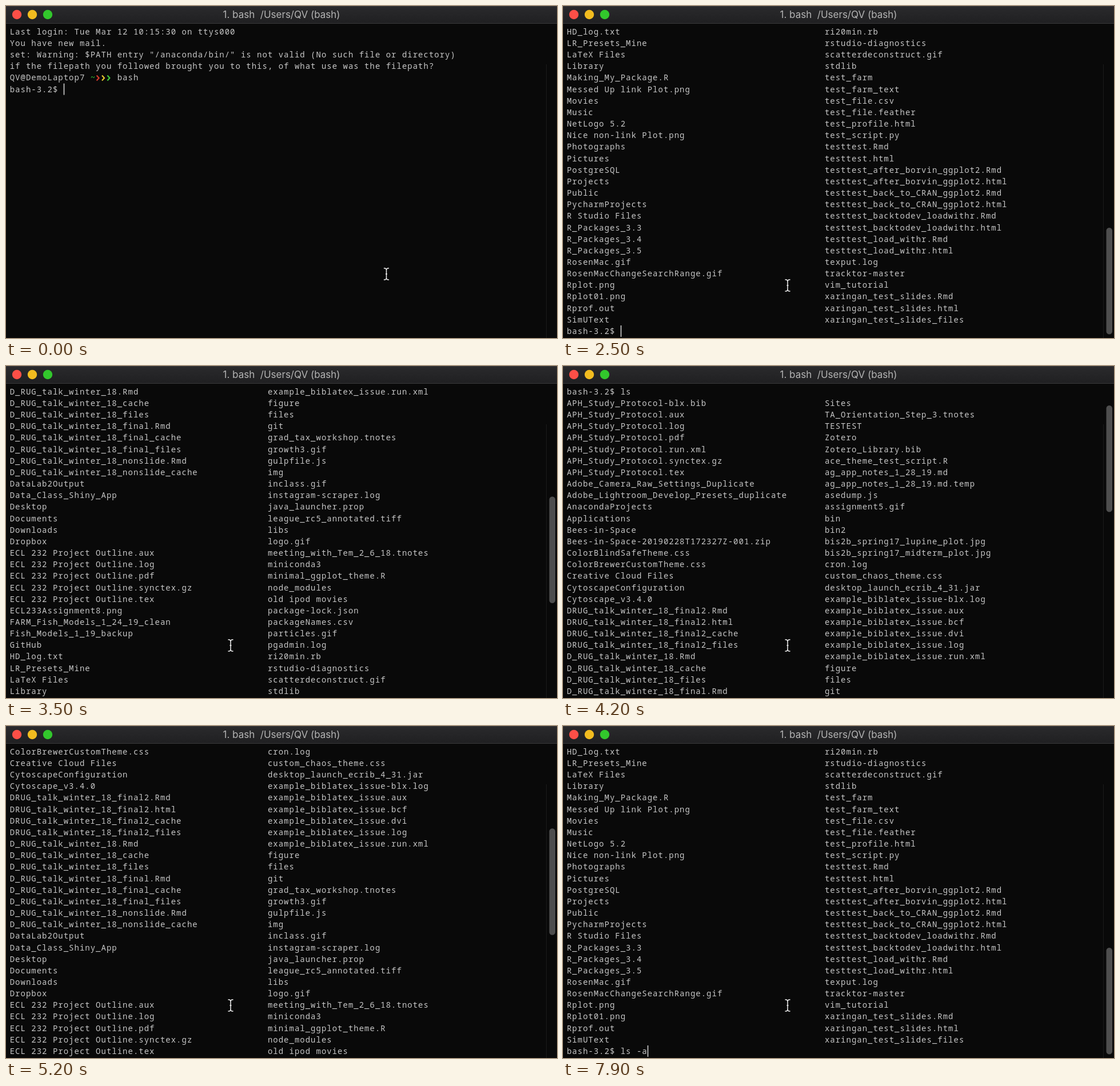
Write an HTML page with a canvas that moves like this. It is 964 px wide and 581 px high and loops after 8000 ms.

```html
<!DOCTYPE html>
<html lang="en">
<head>
<meta charset="utf-8">
<title>Terminal</title>
<style>
  html, body { margin: 0; width: 100%; height: 100%; overflow: hidden; background: #090909; }
  canvas { display: block; }
</style>
</head>
<body>
<canvas id="stage" width="964" height="581"></canvas>
<script>
const ctx = document.getElementById('stage').getContext('2d');
const LOOP = 8000, STEP = 100;
const LEFT = 6.7, TOP = 34.2, CHAR = 9.4, ROW = 20.16, ROWS = 27, TAB = 48;
const MONO = '14px "Noto Sans Mono", monospace';
const PROMPT = 'bash-3.2$ ';

const intro = [
  'Last login: Tue Mar 12 10:15:30 on ttys000',
  'You have new mail.',
  'set: Warning: $PATH entry "/anaconda/bin/" is not valid (No such file or directory)',
  'if the filepath you followed brought you to this, of what use was the filepath?',
  'QV@DemoLaptop7      bash',
];

const listing = `APH_Study_Protocol-blx.bib|Sites
APH_Study_Protocol.aux|TA_Orientation_Step_3.tnotes
APH_Study_Protocol.log|TESTEST
APH_Study_Protocol.pdf|Zotero
APH_Study_Protocol.run.xml|Zotero_Library.bib
APH_Study_Protocol.synctex.gz|ace_theme_test_script.R
APH_Study_Protocol.tex|ag_app_notes_1_28_19.md
Adobe_Camera_Raw_Settings_Duplicate|ag_app_notes_1_28_19.md.temp
Adobe_Lightroom_Develop_Presets_duplicate|asedump.js
AnacondaProjects|assignment5.gif
Applications|bin
Bees-in-Space|bin2
Bees-in-Space-20190228T172327Z-001.zip|bis2b_spring17_lupine_plot.jpg
ColorBlindSafeTheme.css|bis2b_spring17_midterm_plot.jpg
ColorBrewerCustomTheme.css|cron.log
Creative Cloud Files|custom_chaos_theme.css
CytoscapeConfiguration|desktop_launch_ecrib_4_31.jar
Cytoscape_v3.4.0|example_biblatex_issue-blx.log
DRUG_talk_winter_18_final2.Rmd|example_biblatex_issue.aux
DRUG_talk_winter_18_final2.html|example_biblatex_issue.bcf
DRUG_talk_winter_18_final2_cache|example_biblatex_issue.dvi
DRUG_talk_winter_18_final2_files|example_biblatex_issue.log
D_RUG_talk_winter_18.Rmd|example_biblatex_issue.run.xml
D_RUG_talk_winter_18_cache|figure
D_RUG_talk_winter_18_files|files
D_RUG_talk_winter_18_final.Rmd|git
D_RUG_talk_winter_18_final_cache|grad_tax_workshop.tnotes
D_RUG_talk_winter_18_final_files|growth3.gif
D_RUG_talk_winter_18_nonslide.Rmd|gulpfile.js
D_RUG_talk_winter_18_nonslide_cache|img
DataLab2Output|inclass.gif
Data_Class_Shiny_App|instagram-scraper.log
Desktop|java_launcher.prop
Documents|league_rc5_annotated.tiff
Downloads|libs
Dropbox|logo.gif
ECL 232 Project Outline.aux|meeting_with_Tem_2_6_18.tnotes
ECL 232 Project Outline.log|miniconda3
ECL 232 Project Outline.pdf|minimal_ggplot_theme.R
ECL 232 Project Outline.synctex.gz|node_modules
ECL 232 Project Outline.tex|old ipod movies
ECL233Assignment8.png|package-lock.json
FARM_Fish_Models_1_24_19_clean|packageNames.csv
Fish_Models_1_19_backup|particles.gif
GitHub|pgadmin.log
HD_log.txt|ri20min.rb
LR_Presets_Mine|rstudio-diagnostics
LaTeX Files|scatterdeconstruct.gif
Library|stdlib
Making_My_Package.R|test_farm
Messed Up link Plot.png|test_farm_text
Movies|test_file.csv
Music|test_file.feather
NetLogo 5.2|test_profile.html
Nice non-link Plot.png|test_script.py
Photographs|testtest.Rmd
Pictures|testtest.html
PostgreSQL|testtest_after_borvin_ggplot2.Rmd
Projects|testtest_after_borvin_ggplot2.html
Public|testtest_back_to_CRAN_ggplot2.Rmd
PycharmProjects|testtest_back_to_CRAN_ggplot2.html
R Studio Files|testtest_backtodev_loadwithr.Rmd
R_Packages_3.3|testtest_backtodev_loadwithr.html
R_Packages_3.4|testtest_load_withr.Rmd
R_Packages_3.5|testtest_load_withr.html
RosenMac.gif|texput.log
RosenMacChangeSearchRange.gif|tracktor-master
Rplot.png|vim_tutorial
Rplot01.png|xaringan_test_slides.Rmd
Rprof.out|xaringan_test_slides.html
SimUText|xaringan_test_slides_files`.split('\n');

// Time of each key press, and of the return key after the first command
const firstKeys = [1700, 1800], secondKeys = [6500, 6700, 6900, 7300, 7600];
const RETURN = 2000;

// [time, value] points, joined by straight lines
const scrollPath = [[2700, 51], [3500, 28], [4200, 5], [4700, 5], [5200, 20.9], [5600, 51]];
const pointerPath = [[1900, 0], [2400, 1]];
const caretPath = [[0, 1], [200, 0], [500, 0], [700, 1]];

function follow(path, t) {
  if (t <= path[0][0]) return path[0][1];
  for (let i = 1; i < path.length; i++) {
    const [t0, a] = path[i - 1], [t1, b] = path[i];
    if (t < t1) return a + (b - a) * (t - t0) / (t1 - t0);
  }
  return path[path.length - 1][1];
}

const typed = (text, keys, t) => text.slice(0, keys.filter(k => k <= t).length);

function text(str, col, row) {
  ctx.fillText(str, LEFT + col * CHAR, TOP + row * ROW + 15.6);
}

function polyline(points, color, width) {
  ctx.beginPath();
  points.forEach(([x, y]) => ctx.lineTo(x, y));
  ctx.strokeStyle = color;
  ctx.lineWidth = width;
  ctx.stroke();
}

function drawTitleBar() {
  const shade = ctx.createLinearGradient(0, 0, 0, 30);
  shade.addColorStop(0, '#2a2a2c');
  shade.addColorStop(1, '#202022');
  ctx.fillStyle = shade;
  ctx.fillRect(0, 0, 964, 30);
  ctx.fillStyle = '#3a3a3b';
  ctx.fillRect(0, 0, 964, 1);
  ctx.fillRect(0, 30, 964, 1);
  ['#fc4f47', '#f2bc1f', '#32c72c'].forEach((color, i) => {
    ctx.fillStyle = color;
    ctx.beginPath();
    ctx.arc(19 + 27 * i, 15, 8.2, 0, 7);
    ctx.fill();
  });
  ctx.fillStyle = '#b4b4b4';
  ctx.font = '17px Inter, sans-serif';
  ctx.letterSpacing = '0px';
  ctx.textAlign = 'center';
  ctx.fillText('1. bash\u00a0 /Users/QV (bash)', 482, 21.3);
  ctx.textAlign = 'left';
}

function drawShellPrompt(row) {
  ctx.fillStyle = '#35c435';
  text('~', 15, row);
  const y = TOP + row * ROW + 11.2;
  ['#d23a2c', '#e3c52f', '#3fc93a'].forEach((color, i) => {
    const x = 158.6 + i * CHAR;
    polyline([[x, y - 4.5], [x + 4, y], [x, y + 4.5]], color, 2.2);
  });
}

function drawScrollBar(first, visible) {
  ctx.fillStyle = '#1a1a1a';
  ctx.fillRect(945, 102, 1, 479);
  if (!visible) return;
  ctx.fillStyle = '#4e4e4e';
  ctx.beginPath();
  ctx.roundRect(950.5, 34.4 + first * 6.935, 10.5, 186.5, 5.2);
  ctx.fill();
}

function drawPointer(x, y) {
  const color = '#f0f0f0', width = 1.5;
  polyline([[x, y - 8], [x, y + 8]], color, width);
  polyline([[x - 1.5, y], [x + 1.5, y]], color, width);
  for (const s of [-1, 1])
    polyline([[x - 4.5, y + s * 10.3], [x - 1.5, y + s * 9.8], [x, y + s * 8],
              [x + 1.5, y + s * 9.8], [x + 4.5, y + s * 10.3]], color, width);
}

function draw(t) {
  const listed = t >= RETURN;
  const lines = [...intro, PROMPT + typed('ls', firstKeys, t)];
  if (listed) lines.push(...listing, PROMPT + typed('ls -a', secondKeys, t));
  const scroll = listed ? follow(scrollPath, t) : 0;
  const first = Math.floor(scroll);

  ctx.fillStyle = '#090909';
  ctx.fillRect(0, 0, 964, 581);
  drawTitleBar();

  ctx.font = MONO;
  ctx.letterSpacing = '1px';
  lines.slice(first, first + ROWS).forEach((line, row) => {
    ctx.fillStyle = '#c6c6c6';
    line.split('|').forEach((part, i) => text(part, i * TAB, row));
    if (first + row === intro.length - 1) drawShellPrompt(row);
  });

  const last = lines.length - 1, caretRow = last - first;
  if (caretRow < ROWS) {
    ctx.globalAlpha = follow(caretPath, t);
    ctx.fillStyle = '#d0d0d0';
    ctx.fillRect(LEFT + lines[last].length * CHAR, TOP + caretRow * ROW + 0.6, 1.6, 20);
    ctx.globalAlpha = 1;
  }

  drawScrollBar(scroll, listed);
  const p = follow(pointerPath, t);
  drawPointer(665.5 - 272.5 * p, 469 + 20 * p);
}

function tick(now) {
  draw(Math.floor(now % LOOP / STEP) * STEP);
  requestAnimationFrame(tick);
}
requestAnimationFrame(tick);
</script>
</body>
</html>
```
